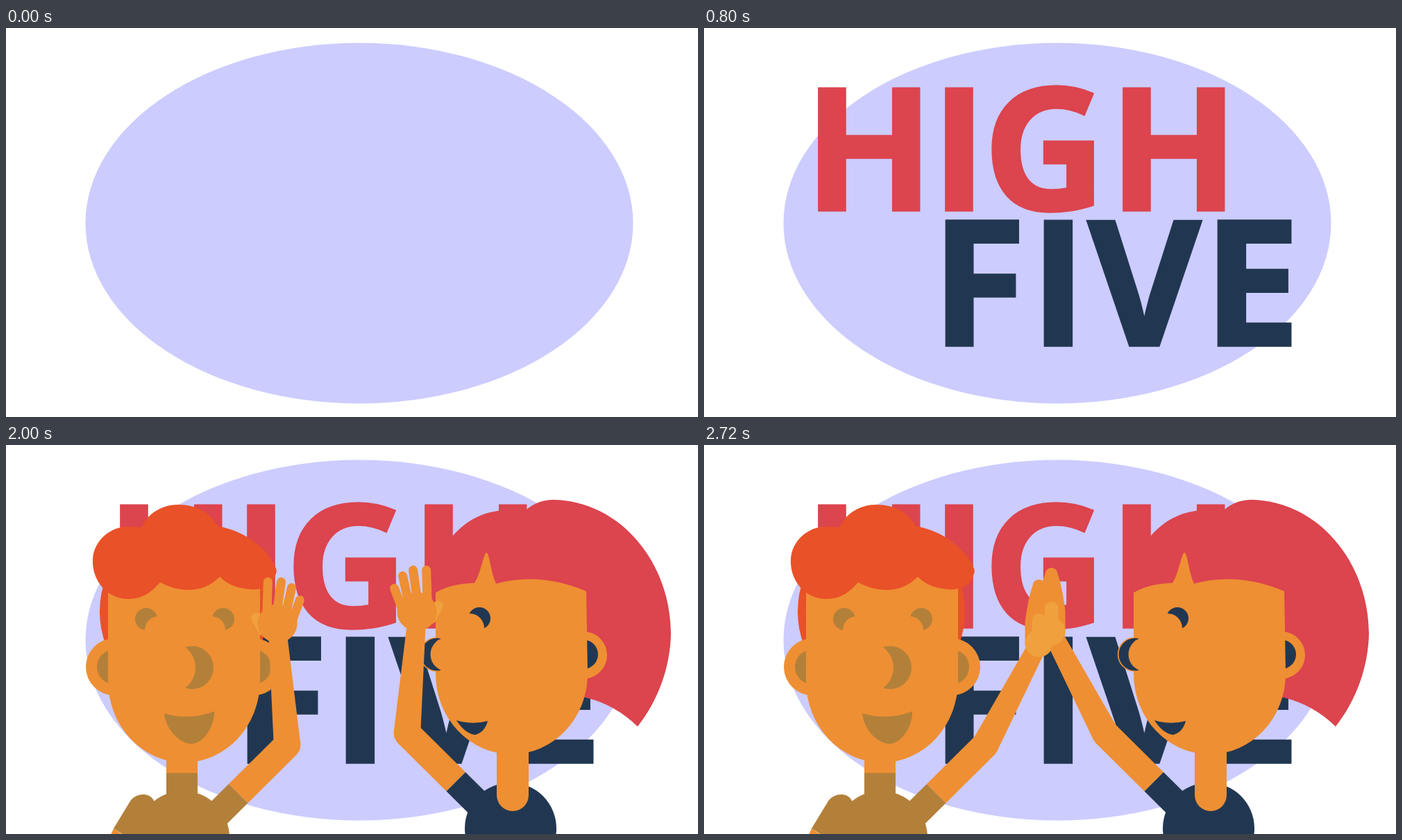
An HTML page with a canvas that plays this animation: 997 by 561 pixels, repeating every 2.8 s.

```html
<!DOCTYPE html>
<html lang="en">
<head>
<meta charset="utf-8">
<title>High five</title>
<style>
html, body { margin: 0; width: 100%; height: 100%; overflow: hidden; background: #fff; }
canvas { display: block; }
</style>
</head>
<body>
<canvas id="stage" width="997" height="561"></canvas>
<script>
const ctx = document.getElementById('stage').getContext('2d');
const LOOP = 2800, STEP = 80;
const LILAC = '#ccccff', RED = '#dc444e', NAVY = '#213751', SKIN = '#ee8f33',
      THUMB = '#f0a03c', GINGER = '#e95128', BROWN = '#b3803a', FLASH = '#ffe27a';

const mix = (a, b, k) => a + (b - a) * k;
const ramp = (t, from, to) => Math.min(1, Math.max(0, (t - from) / (to - from)));
const rad = deg => deg * Math.PI / 180;

function oval(x, y, rx, ry, color) {
  ctx.fillStyle = color;
  ctx.beginPath();
  ctx.ellipse(x, y, rx, ry, 0, 0, 7);
  ctx.fill();
}
const disc = (x, y, r, color) => oval(x, y, r, r, color);

function shape(d, color) {
  ctx.fillStyle = color;
  ctx.fill(new Path2D(d));
}

function line(x1, y1, x2, y2, width, color, cap = 'round') {
  ctx.strokeStyle = color;
  ctx.lineWidth = width;
  ctx.lineCap = cap;
  ctx.beginPath();
  ctx.moveTo(x1, y1);
  ctx.lineTo(x2, y2);
  ctx.stroke();
}

// ---- lettering ----
const HIGH = { text: 'HIGH', at: [164, 347, 414, 603], size: 246, color: RED,
  box: [164, 87, 750, 265], from: [164, 95, 605, 95], start: 80 };
const FIVE = { text: 'FIVE', at: [347, 489, 551, 739], size: 251.5, color: NAVY,
  box: [347, 276.5, 854, 460], from: [325, 287, 707, 287], start: 400 };

function drawWord(word, t) {
  const k = ramp(t, word.start, word.start + 400);
  if (k === 0) return;
  const [l, top, r, bottom] = word.box;
  const b = word.box.map((v, i) => mix(word.from[i], v, k));
  ctx.save();
  ctx.translate(b[0], b[1]);
  ctx.scale((b[2] - b[0]) / (r - l), (b[3] - b[1]) / (bottom - top));
  ctx.translate(-l, -top);
  ctx.font = `bold ${word.size}px "Open Sans", sans-serif`;
  ctx.fillStyle = ctx.strokeStyle = word.color;
  ctx.lineWidth = 3.4;
  ctx.lineJoin = 'miter';
  ctx.miterLimit = 3;
  [...word.text].forEach((ch, i) => {
    const x = word.at[i] + ctx.measureText(ch).actualBoundingBoxLeft + 1.7;
    ctx.fillText(ch, x, bottom - 1.7);
    ctx.strokeText(ch, x, bottom - 1.7);
  });
  ctx.restore();
}

// ---- people ----
function drawBoy() {
  oval(255.5, 240, 120.5, 130, GINGER);
  for (const x of [156, 357]) {
    disc(x, 320, 41, SKIN);
    disc(x, 320, 25, BROWN);
  }
  shape('M155 553L168 562H151Z', SKIN);
  shape('M155 553L180 512Q188 503 200 504Q210 506 213 513L230 562H169Z', BROWN);
  disc(255, 566, 67, BROWN);
  ctx.fillRect(231, 473, 45, 40);
  ctx.fillStyle = SKIN;
  ctx.fillRect(231, 430, 45, 43);
  shape('M147 180H366V340A109.5 118 0 0 1 147 340Z', SKIN);
  shape(`M222 198C205 218 190 222 176 222C145 222 124 195 125 166C126 135 155 116 178 118
    Q186 117 195 119C205 98 225 86 248 86C275 86 295 98 305 117C345 124 378 150 389 178
    Q391 183 387 190C383 205 365 210 350 208C330 206 318 200 308 190
    C295 203 280 209 263 209C248 209 235 205 222 198Z`, GINGER);
  disc(202, 251, 16, BROWN);
  disc(220, 267, 20, SKIN);
  disc(313, 251, 16, BROWN);
  disc(296, 267, 20, SKIN);
  disc(268, 321, 31, BROWN);
  disc(236.5, 321, 36.5, SKIN);
  shape('M228 387Q265 398 300 384C301 405 285 430 268 431C250 431 230 410 228 387Z', BROWN);
}

function drawGirl() {
  shape(`M619 215C617 180 625 155 643 132C665 106 692 95 720 94Q738 92 750 93
    Q767 79 788 79C885 80 958 170 958 272C957 320 940 368 910 406
    Q878 375 838 365L700 330Z`, RED);
  disc(832, 303, 34, SKIN);
  disc(832, 302, 21, NAVY);
  disc(727, 553, 66, NAVY);
  line(730, 430, 730, 505, 46, SKIN);
  shape(`M619 213Q640 200 675 199C684 185 688 157 692 155C697 157 698 182 706 200
    Q770 183 836 211L838 330A109.5 116 0 0 1 619 330Z`, SKIN);
  disc(620.5, 302, 24.8, SKIN);
  disc(621, 302, 23.5, NAVY);
  disc(636, 302, 24.5, SKIN);
  disc(682, 250, 16, NAVY);
  disc(668, 264, 21, SKIN);
  shape('M649 397Q672 404 694 398Q690 414 676 418C665 417 655 407 649 397Z', NAVY);
}

// ---- arms: time, shoulder x, y, lift, upper length, forearm angle, hand angle ----
const POSES = [
  [1440, 301, 532, -34, 160.6, 4, -4],
  [1760, 294.5, 535, 23.7, 154, 2.3, 0],
  [1920, 288, 549, 44.8, 165, 0, -2],
  [2320, 288, 549, 44.8, 165, -24.2, -22],
  [2400, 288, 549, 44.8, 165, 27.8, 0]
];

function poseAt(t) {
  let i = 0;
  while (i < POSES.length - 2 && t >= POSES[i + 1][0]) i++;
  const a = POSES[i], b = POSES[i + 1], k = ramp(t, a[0], b[0]);
  const [, sx, sy, lift, len, fore, hand] = a.map((v, j) => mix(v, b[j], k));
  const ux = Math.cos(rad(lift)), uy = -Math.sin(rad(lift));
  return { sx, sy, ux, uy, len, fore, hand, ex: sx + ux * len, ey: sy + uy * len,
    open: t < 2080 };
}

function atHand(p, draw) {
  const reach = p.open ? 150 : 166;
  ctx.save();
  ctx.translate(p.ex + Math.sin(rad(p.fore)) * reach, p.ey - Math.cos(rad(p.fore)) * reach);
  ctx.rotate(rad(p.hand));
  draw();
  ctx.restore();
}

function openHand() {
  line(-28, -37, -20, -18, 15, THUMB);
  oval(1.5, -26, 28.5, 28, SKIN);
  line(-6, -87, -13, -36, 13, SKIN);
  line(13, -85, 0, -33, 13, SKIN);
  line(27, -75, 12, -30, 13, SKIN);
  line(37, -56, 20, -22, 13, SKIN);
}

function sideHand() {
  shape('M-20 0V-30Q-15 -68 -9 -83A9 9 0 0 1 9 -83Q15 -68 20 -30V0A20 20 0 0 1 -20 0Z', SKIN);
}

function sideThumb() {
  disc(0, 0, 20, THUMB);
  line(0, -4, 0, -33, 20, THUMB);
}

function drawArm(p, sleeve) {
  const cuff = p.len - 99;
  const along = d => [p.sx + p.ux * d, p.sy + p.uy * d];
  disc(...along(13), 17, sleeve);
  line(...along(14), ...along(cuff), 39, sleeve, 'butt');
  line(...along(cuff), p.ex, p.ey, 39, SKIN, 'butt');
  disc(p.ex, p.ey, 19.3, SKIN);
  ctx.save();
  ctx.translate(p.ex, p.ey);
  ctx.rotate(rad(p.fore));
  shape('M-19.3 0L-13.5 -156H13.5L19.3 0Z', SKIN);
  ctx.restore();
  atHand(p, p.open ? openHand : sideHand);
}

function mirrored(draw) {
  ctx.save();
  ctx.translate(983, -17);
  ctx.scale(-1, 1);
  draw();
  ctx.restore();
}

function drawArms(t) {
  const p = poseAt(t);
  mirrored(() => drawArm(p, NAVY));
  drawArm(p, BROWN);
  if (p.open) return;
  mirrored(() => atHand(p, sideThumb));
  atHand(p, sideThumb);
}

function drawFlash(t) {
  if (t <= 2400 || t >= 2720) return;
  ctx.globalAlpha = 0.6;
  disc(493.5, 240.5, 256.5 * (t - 2400) / STEP, FLASH);
  ctx.globalAlpha = 1;
}

function render(t) {
  ctx.fillStyle = '#fff';
  ctx.fillRect(0, 0, 997, 561);
  oval(509, 281.5, 394.5, 260, LILAC);
  drawWord(HIGH, t);
  drawWord(FIVE, t);
  if (t < 1440) return;
  drawBoy();
  drawGirl();
  drawArms(t);
  drawFlash(t);
}

const begin = performance.now();
function tick() {
  const t = (performance.now() - begin) % LOOP;
  render(Math.floor(t / STEP) * STEP);
  requestAnimationFrame(tick);
}
tick();
</script>
</body>
</html>
```
